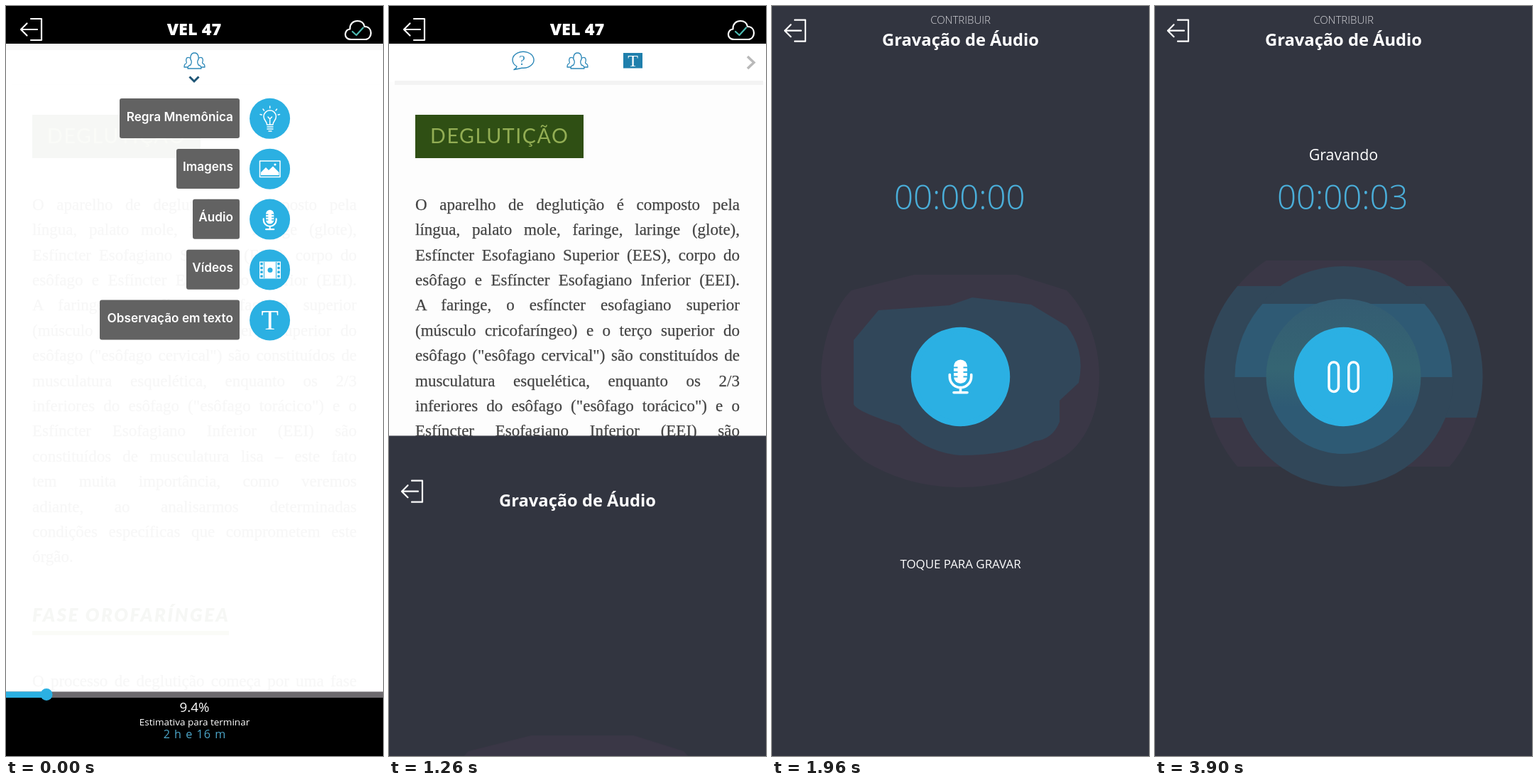
An HTML page that plays this animation: 531x1055 px, repeating every 3.94 s.

```html
<!DOCTYPE html>
<html lang="pt">
<head>
<meta charset="utf-8">
<title>Gravação de Áudio</title>
<style>
html, body { margin: 0; width: 100%; height: 100%; overflow: hidden; background: #fdfdfd; }
#stage { position: absolute; left: 0; top: 0; width: 531px; height: 1055px; overflow: hidden; }
#stage svg { position: absolute; left: 0; top: 0; overflow: visible; }
#stage svg { font-family: "Open Sans", "Noto Sans", sans-serif; }
.line {
  position: absolute; left: 37px; width: 457px; height: 35.4px;
  font: 23px/35.4px "Liberation Serif", "Noto Serif", serif; color: #444;
  -webkit-text-stroke: .25px #444;
  white-space: nowrap; text-align: justify; text-align-last: justify;
}
.line.last { text-align-last: left; }
.head { font-family: Lato, "Open Sans", sans-serif; }
.serif { font-family: "Liberation Serif", "Noto Serif", serif; }
.mid { text-anchor: middle; }
.label { font: 600 17.2px Inter, Roboto, sans-serif; fill: #fff; text-anchor: end; }
.thin { fill: none; stroke-linecap: round; stroke-linejoin: round; }
#panel { will-change: transform; }
</style>
</head>
<body>
<div id="stage">
  <svg width="531" height="1055">
    <defs>
      <g id="exit" class="thin" stroke="#fff" stroke-width="2.2">
        <path d="M35 18H50V48H35M44 33H21M29.5 24.5L21 33L29.5 41.5"/>
      </g>
      <g id="people" class="thin" stroke="#2c88b8" stroke-width="1.3">
        <path d="M260 83C261 80 262 80 261 77C259 75 259 66 265.5 66S272 75 270 77C269 80 270 80 271 83C275 84 275 86 275 88H256C256 86 256 84 260 83Z"/>
        <path d="M259 73C255 71 253 74 254 78C255 80 254 81 252 82C251 83 251 84 251 86H256M272 73C276 71 278 74 277 78C276 80 277 81 279 82C280 83 280 84 280 86H275"/>
      </g>
      <g id="mic">
        <rect x="-9.5" y="-24" width="19" height="33.5" rx="9.5" fill="#fff"/>
        <path d="M-10 -13H-4M4 -13H10M-10 -6.5H-4M4 -6.5H10M-10 0H-4M4 0H10" stroke="#2bb0e3" stroke-width="2.2"/>
        <path class="thin" d="M-15.2 -3V0A15.2 15.2 0 0 0 15.2 0V-3M0 15V22M-9.5 22.3H9.5" stroke="#fff" stroke-width="3.6"/>
      </g>
    </defs>
    <rect width="531" height="1055" fill="#fdfdfd"/>
    <rect x="37" y="153" width="237" height="61" fill="#2f4f14"/>
    <text class="head mid" x="155.8" y="193" font-size="28.6" letter-spacing="1.6" fill="#93ae54">DEGLUTIÇÃO</text>
    <text class="head" x="37" y="866" font-size="26" font-weight="900" font-style="italic" letter-spacing="2.5" fill="#2f5010">FASE OROFARÍNGEA</text>
    <rect x="37" y="879" width="277" height="6" fill="#8dab49"/>
    <rect y="53" width="531" height="54" fill="#fff"/>
    <rect x="8" y="105" width="519" height="6" fill="#f3f3f3"/>
    <use href="#people"/>
    <path class="thin" stroke="#2c88b8" stroke-width="1.4" d="M180 85A15 11.5 0 1 1 187 87.2Q181 88.5 176 89.5Q179.5 88 180 85Z"/>
    <text class="serif mid" x="187.5" y="82.5" font-size="19" fill="#2c88b8">?</text>
    <rect x="330" y="66" width="27" height="21.5" fill="#1f7fac"/>
    <text class="serif mid" x="343.5" y="84.5" font-size="24" fill="#fff">T</text>
    <path d="M505 71L514 79.5L505 88" fill="none" stroke="#b9b9b9" stroke-width="3.5"/>
  </svg>
  <div id="lines"></div>

  <svg id="menu" width="531" height="1055">
    <rect y="110" width="531" height="855" fill="#fff" opacity=".955"/>
    <rect y="53" width="531" height="57" fill="#fff"/>
    <rect y="53" width="531" height="9" fill="#f8f8f8"/>
    <use href="#people"/>
    <path d="M258.5 99.5L265 106L271.5 99.5" fill="none" stroke="#1d5475" stroke-width="3"/>
    <g id="items"></g>
    <g class="thin" stroke="#fff" stroke-width="1.5">
      <path d="M367.5 167C367.5 162 363 161 363 155.5A8.7 8.7 0 0 1 380.4 155.5C380.4 161 376 162 376 167ZM368 170H376M368 173H376M370 176H374M371.7 167V159L369 156M371.7 159L374.5 156"/>
      <path d="M371.7 141V143.5M362 145L363.5 147M381.5 145L380 147M358 152.5L360.2 153M385.5 152.5L383.2 153"/>
      <rect x="357.5" y="218" width="28.5" height="22.5"/>
    </g>
    <path d="M359 238V234L366 227L370 231L376 225.5L384.5 234V238Z" fill="#fff"/>
    <circle cx="379" cy="223" r="1.6" fill="#fff"/>
    <use href="#mic" transform="translate(371.7 301) scale(.59)"/>
    <rect x="357" y="359.5" width="30" height="24" fill="#fff"/>
    <path d="M360 361V383M384 361V383" stroke="#2bb0e2" stroke-width="3.5" stroke-dasharray="3.4 2.4"/>
    <path d="M363.5 360V383M380.5 360V383" stroke="#2bb0e2"/>
    <circle cx="372" cy="371.5" r="3.5" fill="#2bb0e2"/>
    <text class="serif mid" x="371.7" y="455" font-size="40" fill="#fff">T</text>
  </svg>

  <svg width="531" height="1055">
    <rect width="531" height="53" fill="#000"/>
    <use href="#exit"/>
    <text class="mid" x="265" y="41" font-size="23.5" font-weight="800" fill="#fff">VEL 47</text>
    <path class="thin" d="M486 47C480 47 477.5 43 478 39C478.5 35 481 33 484.5 32.5C484 25 489 21 495 21C500.5 21 504 24 505 29C511 29 514 33 514 38C514 43 510.5 47 506 47Z" stroke="#fff" stroke-width="2.2"/>
    <path class="thin" d="M488 36L493.5 41L503 30.5" stroke="#4cb9b0" stroke-width="2.2"/>
    <rect y="973" width="531" height="82" fill="#000"/>
    <rect y="964.5" width="531" height="8.5" fill="#6d6a6e"/>
    <rect y="964.5" width="57" height="8.5" fill="#2bb0e2"/>
    <circle cx="57" cy="968.5" r="8.5" fill="#2bb0e2"/>
    <g class="mid" fill="#fff">
      <text x="265.5" y="993" font-size="18.8">9.4%</text>
      <text x="265.5" y="1011.5" font-size="13.5">Estimativa para terminar</text>
      <text x="266" y="1030" font-size="16.2" letter-spacing="1" fill="#4ba5c8">2 h e 16 m</text>
    </g>
  </svg>

  <svg id="panel" width="531" height="1055">
    <defs>
      <clipPath id="cut"><rect x="60" y="358" width="412" height="290"/></clipPath>
      <clipPath id="band"><rect x="60" y="394" width="412" height="185"/></clipPath>
      <clipPath id="upper"><rect x="100" y="419" width="332" height="103"/></clipPath>
      <linearGradient id="ring" x1="0" y1="0" x2="0" y2="1">
        <stop offset="0" stop-color="#345c72"/>
        <stop offset=".45" stop-color="#356573"/>
        <stop offset=".7" stop-color="#2e5a74"/>
      </linearGradient>
    </defs>
    <rect y="-43.5" width="531" height="1150" fill="#323540"/>
    <g id="haloIdle">
      <path d="M69 521C69 470 90 420 112 400L200 378H345L415 400C440 425 461 470 461 521C461 580 435 625 400 640Q340 677 265 677Q190 677 130 640C95 610 69 580 69 521Z" fill="#3a3746"/>
      <path d="M115 470L150 428L250 421L282 410L365 420L415 450Q442 485 432 530L405 555V585Q395 610 370 612Q335 632 265 632Q215 628 180 590Q118 570 115 560Z" fill="#31475a"/>
    </g>
    <g id="haloRec">
      <circle cx="265.5" cy="521" r="196" fill="#3a3746" clip-path="url(#cut)"/>
      <circle cx="265.5" cy="521" r="196" fill="#314759" clip-path="url(#band)"/>
      <circle cx="265.5" cy="521" r="155" fill="#314759"/>
      <circle cx="265.5" cy="521" r="153" fill="#2f5a74" clip-path="url(#upper)"/>
      <circle id="pulse" cx="265.5" cy="521" r="109" fill="url(#ring)"/>
    </g>
    <circle cx="265.5" cy="521.5" r="69.7" fill="#2bb0e3"/>
    <circle id="press" cx="265.5" cy="521.5" r="62" fill="#236c82"/>
    <circle id="core" cx="265.5" cy="521.5" r="42" fill="#2bb0e3"/>
    <use id="micBig" href="#mic" transform="translate(265.5 521.5)"/>
    <g id="pause" fill="none" stroke="#fff" stroke-width="3.5">
      <rect x="245" y="501" width="13.5" height="41.5" rx="6.75"/>
      <rect x="272.8" y="501" width="13.5" height="41.5" rx="6.75"/>
    </g>
    <use href="#exit" transform="translate(-3 1.7)"/>
    <g class="mid" fill="#fff">
      <text id="small" x="265.5" y="25" font-size="15" font-weight="300" fill="#d8d8dc">CONTRIBUIR</text>
      <text x="265.5" y="56" font-size="23.7" font-weight="700">Gravação de Áudio</text>
      <text id="state" x="265.5" y="217" font-size="21.4">Gravando</text>
      <text id="hint" x="265.5" y="790.5" font-size="16.9">TOQUE PARA GRAVAR</text>
    </g>
    <text id="clock" x="172" y="286" font-size="47.3" font-weight="300" fill="#4aaed9">00:00:00</text>
  </svg>
</div>
<script>
const LOOP = 3940;
const $ = id => document.getElementById(id);

const body = [
  'O aparelho de deglutição é composto pela',
  'língua, palato mole, faringe, laringe (glote),',
  'Esfíncter Esofagiano Superior (EES), corpo do',
  'esôfago e Esfíncter Esofagiano Inferior (EEI).',
  'A faringe, o esfíncter esofagiano superior',
  '(músculo cricofaríngeo) e o terço superior do',
  'esôfago ("esôfago cervical") são constituídos de',
  'musculatura esquelética, enquanto os 2/3',
  'inferiores do esôfago ("esôfago torácico") e o',
  'Esfíncter Esofagiano Inferior (EEI) são',
  'constituídos de musculatura lisa – este fato',
  'tem muita importância, como veremos',
  'adiante, ao analisarmos determinadas',
  'condições específicas que comprometem este',
  'órgão.'
];

function addLine(text, top, last) {
  const el = document.createElement('div');
  el.className = last ? 'line last' : 'line';
  el.style.top = top + 'px';
  el.textContent = text;
  $('lines').append(el);
}
body.forEach((text, i) => addLine(text, 261.7 + i * 35.4, i === body.length - 1));
addLine('O processo de deglutição começa por uma fase', 932);

const labels = [
  ['Regra Mnemônica', 160], ['Imagens', 240], ['Áudio', 263],
  ['Vídeos', 254], ['Observação em texto', 132]
];
$('items').innerHTML = labels.map(([name, x], i) => {
  const y = 130 + i * 70.9;
  return `<rect x="${x}" y="${y}" width="${329 - x}" height="56" rx="3" fill="#626262"/>
    <text class="label" x="320" y="${y + 31.5}">${name}</text>
    <circle cx="371.6" cy="${y + 28.3}" r="28.5" fill="#2bb0e2"/>`;
}).join('');

// Smooth 0..1 progress between two times
function ramp(t, a, b) {
  const p = Math.min(1, Math.max(0, (t - a) / (b - a)));
  return p * p * (3 - 2 * p);
}
const fade = (id, v) => { $(id).style.opacity = v; };

function draw(t) {
  fade('menu', 1 - ramp(t, 1040, 1180));

  // The recording screen slides up and settles exponentially
  let y = t < 1225 ? 1120 : 1099 * Math.exp(-(t - 1223) * 0.0139);
  if (y < 0.4) y = 0;
  $('panel').style.transform = `translateY(${y}px)`;

  const shown = ramp(t, 1620, 1880);
  fade('small', shown);
  fade('clock', shown);

  const down = ramp(t, 2280, 2420);
  const up = ramp(t, 2460, 2620);
  fade('press', t > 2280 && t < 2620 ? 1 : 0);
  $('core').setAttribute('r', 62 - 20 * (down - up));

  const rec = ramp(t, 2500, 2740);
  fade('haloIdle', 1 - rec);
  fade('haloRec', rec);
  $('pulse').setAttribute('r', 70 + 39 * rec);
  fade('micBig', 1 - ramp(t, 2500, 2600));
  fade('pause', ramp(t, 2580, 2700));
  fade('state', rec);
  fade('hint', 1 - rec);

  const secs = Math.min(3, Math.max(0, Math.floor((t - 2440) / 400)));
  $('clock').textContent = '00:00:0' + secs;
}

const start = performance.now();
function tick(now) {
  draw(Math.max(0, now - start) % LOOP);
  requestAnimationFrame(tick);
}
draw(0);
requestAnimationFrame(tick);
</script>
</body>
</html>
```
